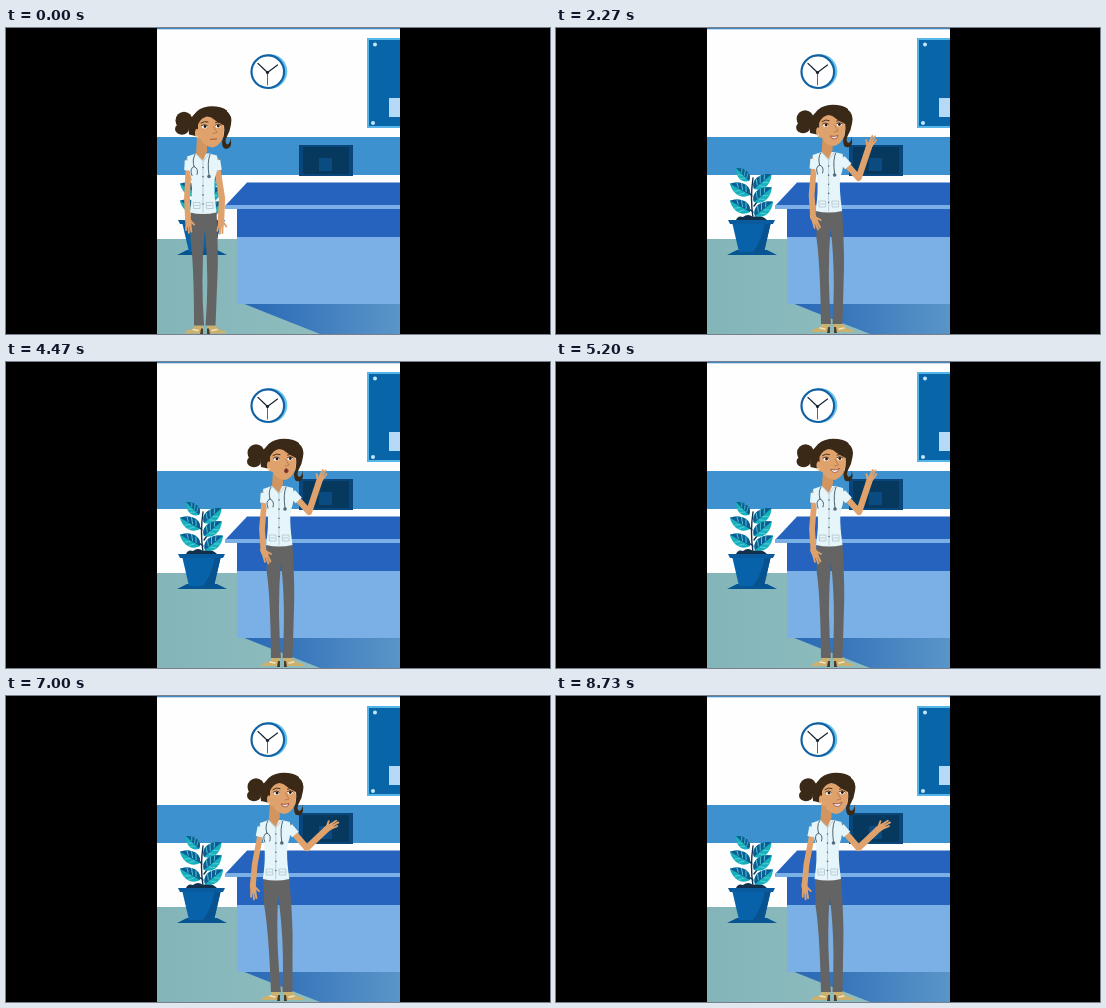
These frames come from a looping animation (544x306 px, 8790 ms). An HTML page:

```html
<!DOCTYPE html>
<html lang="en">
<head>
<meta charset="utf-8">
<title>Reception desk</title>
<style>
  html, body { margin: 0; width: 100%; height: 100%; overflow: hidden; background: #000; }
  svg { display: block; width: 100vw; height: 100vh; }
  .line { fill: none; stroke-linecap: round; stroke-linejoin: round; }
</style>
</head>
<body>
<svg viewBox="0 0 544 306">
  <defs>
    <clipPath id="room"><rect x="151" width="243" height="306"/></clipPath>
    <linearGradient id="floor"><stop stop-color="#83b5b8"/><stop offset="1" stop-color="#94c0c2"/></linearGradient>
    <linearGradient id="shade"><stop stop-color="#2867b5"/><stop offset="1" stop-color="#5a95c8"/></linearGradient>
    <g id="leaf">
      <path d="M0 0C3-9 15-9 23 0C15 8 5 8 0 0" fill="#17b0bd"/>
      <path d="M0 0C3-9 15-9 23 0Z" fill="#0b5d94"/>
      <path d="M5-1l3-5M9-1l4-5M14-1l3-3M6 1l4 4M11 1l4 3" class="line" stroke="#5fd3da" stroke-width=".8"/>
    </g>
    <g id="hand" fill="#dfa26c">
      <path d="M-3-2.7Q3-4 7-2.8L8 1Q5 4-3 2.7Z"/>
      <path d="M4-2L13-2.4M5 0L14 .3M4 2L11 3M1-2L6-6" class="line" stroke="#dfa26c" stroke-width="2"/>
    </g>
  </defs>

  <rect width="544" height="306"/>
  <g clip-path="url(#room)">
    <rect x="150" width="244" height="306" fill="#fefefe"/>
    <rect x="150" width="244" height="1.3" fill="#4387bd"/>
    <rect x="150" y="109" width="244" height="38" fill="#3d91ce"/>
    <rect x="150" y="211" width="244" height="95" fill="url(#floor)"/>

    <circle cx="264" cy="43.5" r="17.3" fill="#64c3ec"/>
    <circle cx="261.8" cy="43.7" r="16.3" fill="#fff" stroke="#1261a3" stroke-width="2.2"/>
    <path d="M261.5 44.5V57" class="line" stroke="#a8484c"/>
    <path d="M252 35.5L261.5 44.5L271.5 37" class="line" stroke="#192534" stroke-width="1.2"/>
    <circle cx="261.5" cy="44.5" r="1.6" fill="#192534"/>

    <rect x="362" y="11" width="50" height="88" fill="#0865a7" stroke="#55b5e9" stroke-width="2"/>
    <rect x="383" y="70" width="20" height="19" fill="#b5d9f6"/>
    <g fill="#c3e7f8"><circle cx="369" cy="16.5" r="2"/><circle cx="367" cy="95" r="2"/></g>

    <path d="M171 227L181 222H211L221 227Z" fill="#075493"/>
    <path d="M176 194H215L208 224H183Z" fill="#0862a9"/>
    <path d="M209 194H215L208 224H197Q206 212 209 194" fill="#07528f"/>
    <path d="M180 192Q182 187 187 189Q192 185 197 189Q205 186 211 192Z" fill="#122f4b"/>
    <path d="M172 192H219L217 196H174Z" fill="#0a5b9d"/>
    <path d="M197 190Q194 170 197 150M196 168L193 165M197 184L193 181M198 178L201 174" class="line" stroke="#12334f" stroke-width="1.4"/>
    <use href="#leaf" transform="translate(193 153) rotate(225) scale(.8 -.85)"/>
    <use href="#leaf" transform="translate(194 167) rotate(209) scale(1 -1)"/>
    <use href="#leaf" transform="translate(194 184) rotate(209) scale(1 -1)"/>
    <use href="#leaf" transform="translate(198 161) rotate(-40)"/>
    <use href="#leaf" transform="translate(198 174) rotate(-39)"/>
    <use href="#leaf" transform="translate(199 188) rotate(-38)"/>

    <path d="M236 275H394V306H314Z" fill="url(#shade)"/>
    <path d="M241 154.5H394V178H219Z" fill="#2563bf"/>
    <rect x="231" y="181" width="163" height="28" fill="#2563bf"/>
    <rect x="231" y="209" width="163" height="67" fill="#7bb0e6"/>
    <rect x="219" y="177" width="175" height="4" fill="#7bb0e6"/>
    <rect x="293" y="117" width="54" height="31" fill="#08467c"/>
    <rect x="297" y="119" width="46" height="27" fill="#07395f"/>
    <rect x="313" y="130" width="13" height="13" fill="#0a4b82"/>

    <g id="woman">
      <path d="M265 296H274V304H255Q257 300 265 299ZM278 296H287Q288 300 297 302V304H278Z" fill="#cbb06e"/>
      <path d="M264 300L269 301M283 301L288 300" class="line" stroke="#f3e3bd" stroke-width="1.4"/>
      <path d="M272 299H274V305H271ZM278 299H280L281 305H278Z" fill="#4c3c2b"/>
      <path id="legs" d="M261.500 181H287.500Q289.500 225 288.500 245L286.500 296H276.500Q280.500 245 275.800 200Q271.500 245 275 296H265Q265 235 261.500 210Z" fill="#646464"/>
      <g id="body">
        <path id="armL" class="line" stroke="#dfa26c" stroke-width="5.800"/>
        <path id="armR" class="line" stroke="#dfa26c" stroke-width="6.300"/>
        <use id="handL" href="#hand"/>
        <use id="handR" href="#hand"/>
        <path id="sleeveL" stroke="#e5f5fa" stroke-width="8.500"/>
        <path id="sleeveR" stroke="#e5f5fa" stroke-width="8.500"/>
        <path d="M267 124H280L288 126Q290 138 286 148Q284 158 287.500 183Q274 186 261 183Q264 163 262.500 150Q260 140 258 127Z" fill="#e5f5fa"/>
        <path d="M268 109H278V122L274 131L267 124Z" fill="#d2955f"/>
        <path d="M267 124L274 132L280 124M274 132V183M264.500 173H271V179H265ZM277.500 173H284V179H278Z" class="line" stroke="#a9bdc7" stroke-width=".7"/>
        <path d="M266 125Q263 130 265 137M265 137Q260 139 263 146M265 137Q270 139 268 145M281 125Q278 132 280 146" class="line" stroke="#4e6572" stroke-width="1"/>
        <circle cx="280" cy="147" r="1.800" fill="#536b78"/>
        <path d="M274 138V180" class="line" stroke="#526a78" stroke-width="1.500" stroke-dasharray=".1 9"/>
        <path d="M265 176H270M278 176H283" stroke="#a9bdc7" stroke-width=".7"/>
      </g>
      <g id="head">
        <g fill="#3b2918">
          <ellipse cx="250" cy="91" rx="8.500" ry="8.800"/>
          <ellipse cx="248" cy="99.500" rx="7" ry="5.800"/>
          <path d="M255 105Q253 91 260 85Q265 78 274 77Q286 76 293 81L290 95L264 107Z"/>
        </g>
        <path d="M264 95Q267 88 273 87L283 89L289 93Q291 101 289 108Q286 116 279 118Q270 117 267 110Q260 109 261 102Q262 98 264 100Z" fill="#dfa26c"/>
        <path d="M273 80Q283 75 292 81Q299 86 297 95Q296 102 293 107Q290 112 293 115Q297 114 296 108Q299 117 294 119Q288 121 288 112Q291 104 290 96Q283 93 276 87Z" fill="#3b2918"/>
        <circle cx="263" cy="107" r="1" fill="#e9d59b"/>
        <g fill="#fff"><ellipse cx="270.500" cy="97" rx="2.700" ry="2"/><ellipse cx="284" cy="96.500" rx="2.600" ry="2"/></g>
        <g fill="#24170f"><circle cx="271" cy="97" r="1.400"/><circle cx="284.300" cy="96.500" r="1.400"/></g>
        <path d="M267 93.500Q270.500 91 274 92.500M281.500 93Q285 91.500 288 93.500M267.500 96Q270.500 93.800 273.200 96M281.500 95.500Q284 93.500 287 95.500" class="line" stroke="#3b2918" stroke-width=".9"/>
        <path d="M279.500 97L283 103L279 104" class="line" stroke="#b2734a" stroke-width=".8"/>
        <path id="mouth" stroke="#96433a" stroke-width=".8" stroke-linejoin="round"/>
      </g>
    </g>
  </g>
</svg>
<script>
const LOOP = 8790;
const $ = id => document.getElementById(id);
const set = (id, name, value) => $(id).setAttribute(name, value);

// Each arm: elbow x, y, wrist x, y, hand angle.
const poses = {
  stand:   { body: 0, left: [258, 168, 259, 190, 85], right: [293, 169, 292, 191, 94] },
  raise:   { body: 0, left: [257, 167, 258.5, 189, 67], right: [304, 150, 314, 120, -62] },
  present: { body: -3, left: [253, 168, 251, 190, 84], right: [305, 152, 325, 133, -31] }
};
// Time, pose, body shift, head shift.
const keys = [
  [0, 'stand', 0, 5], [550, 'stand', 0, 2], [930, 'raise', 0, 0],
  [1000, 'raise', 0, 0], [2000, 'raise', -1.5, -1], [3300, 'raise', -.5, 0],
  [4470, 'raise', -1, 0], [6000, 'raise', -1, -1], [6250, 'raise', -1, -1],
  [6750, 'present', -1.2, 0], [7000, 'present', -1.2, 0], [8730, 'present', .5, 2],
  [LOOP, 'present', .5, 2]
];
const mouths = {
  closed: ['M276 110Q279 109.500 283 109.500', 'none'],
  smile: ['M275 107.500Q280 109 284 106.500Q282 111 279 110.500Q276 110 275 107.500', '#fff'],
  open: ['M275 108Q279 109 283 107.500Q282 111.500 279 111Q276 110.500 275 108', '#f5e5dd'],
  oh: ['M280 106.500Q283 107 282 110Q280 112 278.500 110Q278 107 280 106.500', '#70302b']
};
const speech = ['smile', 'oh', 'closed', 'open', 'oh', 'smile', 'oh', 'open', 'closed', 'oh'];

const clamp = v => Math.max(0, Math.min(1, v));
const smooth = v => v * v * (3 - 2 * v);
const mix = (a, b, p) => a + (b - a) * p;
const mixAll = (a, b, p) => a.map((v, i) => mix(v, b[i], p));

function drawArm(side, shoulder, [ex, ey, wx, wy, angle]) {
  const [sx, sy] = shoulder;
  const reach = 10 / Math.hypot(ex - sx, ey - sy);
  set('arm' + side, 'd', `M${sx} ${sy}L${ex} ${ey}L${wx} ${wy}`);
  set('sleeve' + side, 'd', `M${sx} ${sy}L${mix(sx, ex, reach)} ${mix(sy, ey, reach)}`);
  set('hand' + side, 'transform', `translate(${wx} ${wy}) rotate(${angle}) scale(.95)`);
}

function mouthAt(t) {
  if (t < 800) return 'closed';
  if (t > 8300) return 'smile';
  return speech[Math.floor(t / 130) % speech.length];
}

function draw(t) {
  const i = keys.findIndex((key, n) => n === keys.length - 2 || t < keys[n + 1][0]);
  const [t0, name0, body0, head0] = keys[i];
  const [t1, name1, body1, head1] = keys[i + 1];
  const p = smooth(clamp((t - t0) / (t1 - t0)));
  const from = poses[name0], to = poses[name1];
  const shift = mix(from.body + body0, to.body + body1, p);
  const walk = smooth(clamp(t / 750));
  const lean = -shift / 113;

  set('woman', 'transform', `translate(${mix(-77, 0, walk)} ${mix(1.5, 0, walk)})`);
  set('body', 'transform', `translate(${shift} 0)`);
  set('legs', 'transform', `matrix(1 0 ${lean} 1 ${-lean * 297} 0)`);
  set('head', 'transform', `translate(${mix(head0, head1, p)} 0)`);
  drawArm('L', [260, 131], mixAll(from.left, to.left, p));
  drawArm('R', [287, 131], mixAll(from.right, to.right, p));

  const [path, fill] = mouths[mouthAt(t)];
  set('mouth', 'd', path);
  set('mouth', 'fill', fill);
}

const start = performance.now();
function tick() {
  draw((performance.now() - start) % LOOP);
  requestAnimationFrame(tick);
}
tick();
</script>
</body>
</html>
```
